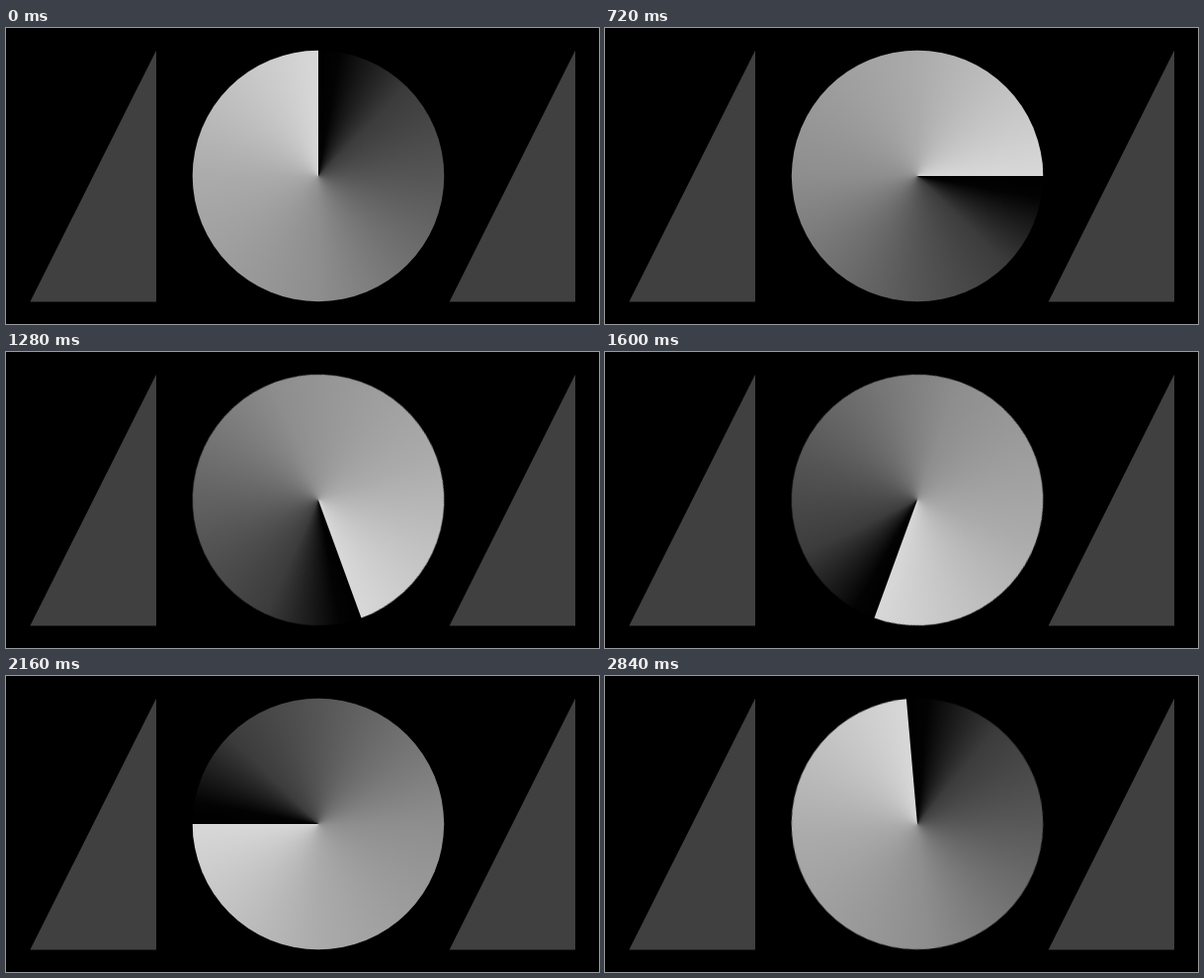
Animation of 600 by 300 pixels, one loop 2.88 s. Source, as an HTML page:

```html
<!DOCTYPE html>
<html lang="en">
<head>
<meta charset="utf-8">
<title>Turning disc</title>
<style>
  html, body {
    margin: 0;
    width: 100%;
    height: 100%;
    overflow: hidden;
    background: #000;
  }
  .stage {
    position: relative;
    width: 600px;
    height: 300px;
  }
  svg {
    position: absolute;
    inset: 0;
    fill: #404040;
  }
  .disc {
    position: absolute;
    left: 188px;
    top: 22px;
    width: 256px;
    height: 256px;
    clip-path: circle(127.3px);
    background: conic-gradient(
      #000 0deg, #030303 10deg, #141414 20deg, #3c3c3c 45deg,
      #555 90deg, #8e8e8e 180deg, #ababab 270deg, #d8d8d8 360deg);
    /* 72 steps of 5 degrees, 40 ms each */
    animation: turn 2880ms steps(72) infinite;
  }
  @keyframes turn {
    to { transform: rotate(360deg); }
  }
</style>
</head>
<body>
<div class="stage">
  <svg width="600" height="300" viewBox="0 0 600 300">
    <path d="M152 22.7V277.5H24.4z"/>
    <path d="M576 22.7V277.5H448.6z"/>
  </svg>
  <div class="disc"></div>
</div>
</body>
</html>
```
